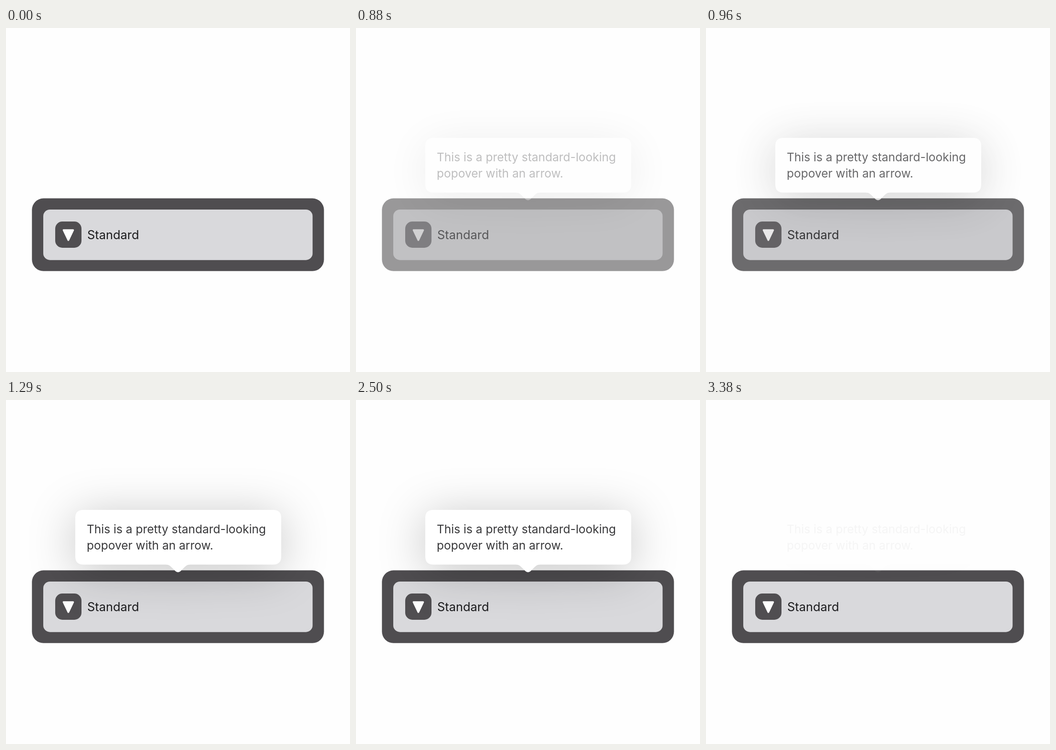
These frames come from a looping animation (720x720 px, 3.96 s). An HTML page:

```html
<!DOCTYPE html>
<html lang="en">
<head>
<meta charset="utf-8">
<title>Popover</title>
<style>
  html, body { margin: 0; width: 100%; height: 100%; overflow: hidden; background: #fefefe; }
  svg { display: block; width: 100%; height: 100%; }
  text { font-family: Inter, "Noto Sans", sans-serif; }
  .bubble { fill: #fff; filter: drop-shadow(0 12px 48px rgba(0, 0, 0, .23)); }
</style>
</head>
<body>
<svg viewBox="0 0 720 720">
  <g class="base"><rect x="54.3" y="356.6" width="611.2" height="152.2" rx="24" fill="#4f4d50"/></g>
  <g class="face"><rect x="78" y="380" width="563.7" height="105.7" rx="14" fill="#d9d9dc"/></g>
  <g class="base"><rect x="103" y="405" width="55" height="55" rx="15" fill="#504e51"/></g>
  <g class="face">
    <path d="M120.5 423H140.5L130.5 444Z" fill="#fff" stroke="#fff" stroke-width="3.6" stroke-linejoin="round"/>
    <text x="170" y="442" font-size="25.4" fill="#1c1c1e">Standard</text>
  </g>
  <g class="popover">
    <path class="bubble" d="M162 230H559Q576 230 576 247V327.5Q576 344.5 559 344.5H386
      C378 344.5 376 348 371 352.5L365 358.5Q360 362.5 355 358.5L349 352.5
      C344 348 342 344.5 334 344.5H162Q145 344.5 145 327.5V247Q145 230 162 230Z"/>
    <g font-size="24.5" fill="#38383a">
      <text x="169" y="279">This is a pretty standard-looking</text>
      <text x="169" y="312.5">popover with an arrow.</text>
    </g>
  </g>
</svg>
<script>
  const LOOP = 3960, TAP = 790, DISMISS = 3290, TICK = 85;

  const clamp = x => Math.min(1, Math.max(0, x));
  const mix = (from, to, p) => from + (to - from) * p;
  const easeOut = p => Math.sin(p * Math.PI / 2);
  const easeInOut = p => p * p * (3 - 2 * p);

  // Time since an event, held between ticks
  const age = (time, event) => Math.floor((time - event) / TICK) * TICK;

  function setOpacity(name, value) {
    document.querySelectorAll("." + name).forEach(part => part.setAttribute("opacity", value));
  }

  function popoverOpacity(time) {
    if (time < TAP) return 0;
    if (time < DISMISS) return easeInOut(clamp((age(time, TAP) + 20) / 280));
    return mix(.4, .04, clamp(age(time, DISMISS) / TICK));
  }

  function draw() {
    const time = performance.now() % LOOP;
    // The tap dims the button at once, then it recovers
    const recovery = time < TAP ? 1 : easeOut(clamp(age(time, TAP) / 300));
    setOpacity("base", mix(.25, 1, recovery));
    setOpacity("face", mix(.37, 1, recovery));
    setOpacity("popover", popoverOpacity(time));
    requestAnimationFrame(draw);
  }

  draw();
</script>
</body>
</html>
```
